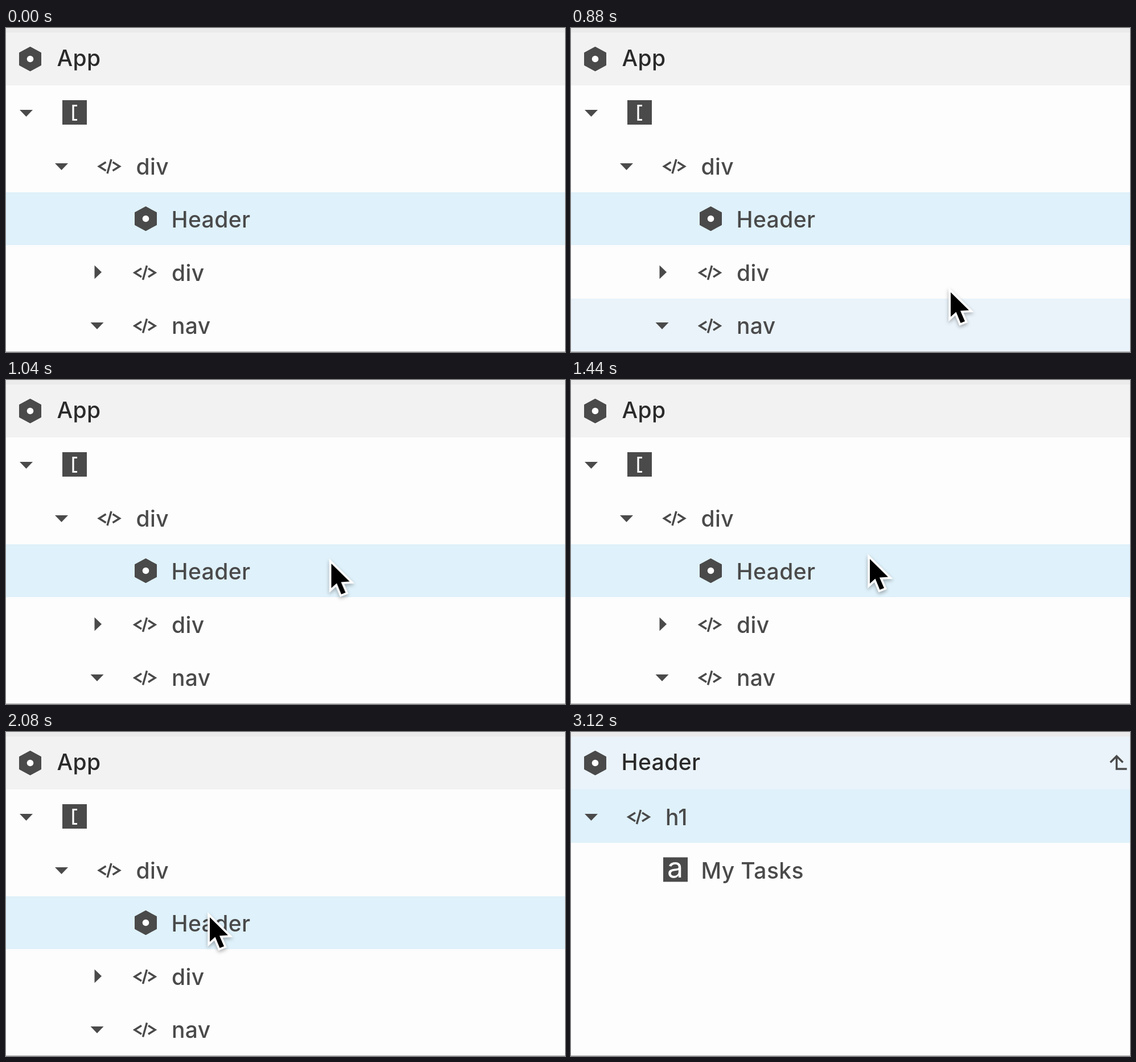
Animation, 982 px wide and 570 px high, one loop 3440 ms. Source, as an HTML page:

```html
<!DOCTYPE html>
<html lang="en">
<head>
<meta charset="utf-8">
<title>Component tree</title>
<style>
  html, body { margin: 0; width: 100%; height: 100%; overflow: hidden; background: #fdfdfd; }
  svg { display: block; width: 982px; height: 570px; }
  text {
    font: 500 39px Inter, sans-serif;
    font-optical-sizing: none;
    letter-spacing: .01em;
    fill: #4a4a4a;
  }
  .title { fill: #2a2a2a; }
  .letter { font-size: 50px; font-weight: 400; letter-spacing: 0; text-anchor: middle; fill: #fff; }
  .solid { fill: #4a4a4a; }
  .line { fill: none; stroke: #4a4a4a; stroke-width: 3.5; }
  .hover { fill: #eaf3fa; }
  .selected { fill: #dff1fa; }

  .anim { animation: 3440ms step-end infinite; }
  #app { animation-name: app; }
  #header { animation-name: header; }
  #nav-hover { animation-name: nav-hover; }
  #div-hover { animation-name: div-hover; }
  #cursor { animation-name: move, fade; filter: drop-shadow(0 3px 3px rgba(0, 0, 0, .3)); }

  @keyframes app { 0% { visibility: visible } 74.41%, 100% { visibility: hidden } }
  @keyframes header { 0% { visibility: hidden } 74.41%, 100% { visibility: visible } }
  @keyframes nav-hover { 0%, 27.9%, 100% { opacity: 0 } 20.93% { opacity: 1 } }
  @keyframes div-hover { 0%, 30.23%, 100% { opacity: 0 } 27.9% { opacity: 1 } }
  @keyframes fade {
    0%, 90.69%, 100% { opacity: 0 }
    18.6% { opacity: 1 }
    88.37% { opacity: .5 }
  }
  /* The pointer sweeps in from the right, rests, then settles on the label. */
  @keyframes move {
    0%, 18.6% { transform: translate(952px, 484px) }
    20.93% { transform: translate(858px, 504px) }
    23.25% { transform: translate(755px, 502px) }
    25.58% { transform: translate(667px, 465px) }
    27.9% { transform: translate(608px, 389px) }
    30.23% { transform: translate(571.5px, 323px) }
    32.55% { transform: translate(571px, 325px) }
    41.86% { transform: translate(525px, 315px) }
    44.18% { transform: translate(432px, 301px) }
    46.51% { transform: translate(367.5px, 297px) }
    48.83% { transform: translate(359px, 315px) }
    51.16%, 100% { transform: translate(358px, 326px) }
  }
</style>
</head>
<body>
<svg viewBox="0 0 982 570">
  <defs>
    <g id="component">
      <path class="solid" stroke="#4a4a4a" stroke-width="2" stroke-linejoin="round"
            d="M0-20.5 18.5-10.5V10.5L0 20.5-18.5 10.5V-10.5Z"/>
      <circle r="5.8" fill="#fff"/>
    </g>
    <path id="tag" class="line" d="M-6-7.5-18 0-6 7.5M6-7.5 18 0 6 7.5M3.5-12.5-3.5 12.5"/>
    <path id="caret" class="solid" d="M-11.5-6H11.5L0 6Z"/>
    <rect id="tile" class="solid" width="43" height="43"/>
  </defs>

  <rect width="982" height="570" fill="#fdfdfd"/>
  <rect width="982" height="8" fill="#ebebeb"/>

  <g id="app" class="anim">
    <rect y="8" width="982" height="93" fill="#f2f2f2"/>
    <rect class="selected" y="289" width="982" height="93"/>
    <rect id="div-hover" class="hover anim" y="382" width="982" height="94"/>
    <rect id="nav-hover" class="hover anim" y="476" width="982" height="93"/>

    <use href="#component" x="42.5" y="54.5"/>
    <text class="title" x="89.5" y="67">App</text>

    <use href="#caret" x="35.5" y="150"/>
    <use href="#tile" x="99" y="127"/>
    <path d="M125 136.5H118V161.5H125" fill="none" stroke="#fff" stroke-width="3.2"/>

    <use href="#caret" x="97.5" y="244"/>
    <use href="#tag" x="181.5" y="243.5"/>
    <text x="228.5" y="258">div</text>

    <use href="#component" x="245.5" y="335.5"/>
    <text x="290.5" y="351">Header</text>

    <path class="solid" d="M155.5 417.5V441.5L168 429.5Z"/>
    <use href="#tag" x="244" y="430.5"/>
    <text x="291" y="445">div</text>

    <use href="#caret" x="160" y="524"/>
    <use href="#tag" x="244" y="524"/>
    <text x="291" y="538">nav</text>
  </g>

  <g id="header" class="anim">
    <rect class="hover" y="8" width="982" height="93"/>
    <rect class="selected" y="101" width="982" height="94"/>

    <use href="#component" x="42.5" y="54.5"/>
    <text class="title" x="88.5" y="67">Header</text>
    <path class="line" d="M947.5 53.5 958.5 42.5 969.5 53.5M958.5 43V65H976.5"/>

    <use href="#caret" x="35.5" y="150"/>
    <use href="#tag" x="119" y="149.5"/>
    <text x="166" y="164">h1</text>

    <use href="#tile" x="162" y="220.5"/>
    <text class="letter" x="183" y="255.5">a</text>
    <text x="228.5" y="258">My Tasks</text>
  </g>

  <rect y="569" width="982" height="1" fill="#a8a8a8"/>

  <g id="cursor" class="anim">
    <path d="M0 0V43L9.5 34.5 17.5 54 25 51 17 32.5 32 31.5Z"
          stroke="#fff" stroke-width="7.5" paint-order="stroke"/>
  </g>
</svg>
</body>
</html>
```
